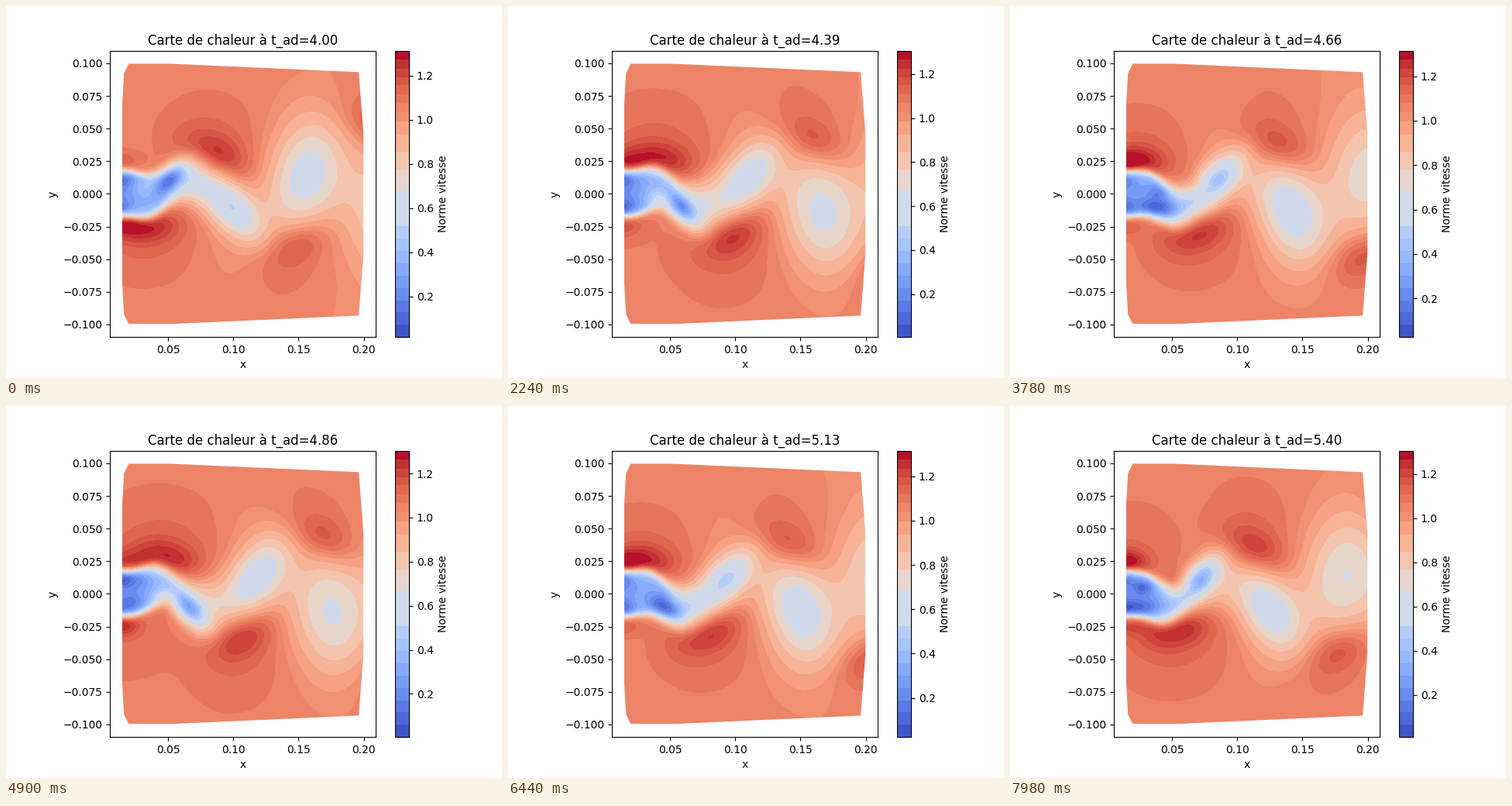
A matplotlib script for the animation above (8 s loop, 640 by 480 pixels).

```python
import numpy as np
import matplotlib.pyplot as plt
from matplotlib.animation import FuncAnimation
from matplotlib.colors import ListedColormap
from matplotlib.patches import Polygon

LOOP, TICK, HOLD = 8000, 40, 140      # ms
STEPS = 58
PERIOD = 6.18                         # steps per shedding cycle
X0, X1, Y1 = .0149, .1997, .0997      # extent of the data

plt.rcParams["font.family"] = "DejaVu Sans"
X, Y = np.meshgrid(np.linspace(X0, X1, 210), np.linspace(-Y1, Y1, 225))


def smooth(u):
    u = np.clip(u, 0, 1)
    return u * u * (3 - 2 * u)


def bell(t, mid, width):
    return np.exp(-((t - mid) / width) ** 2)


def bump(x, y, a, b, deg=0):
    """Tilted Gaussian with widths a and b."""
    c, s = np.cos(np.radians(deg)), np.sin(np.radians(deg))
    dx, dy = X - x, Y - y
    return np.exp(-.5 * (((dx * c + dy * s) / a) ** 2
                         + ((dy * c - dx * s) / b) ** 2))


def fast_x(t):
    """Fast core: rests at the body, then drifts at constant speed."""
    return .012 + .0205 * np.log1p(np.exp((t - .43) / .16))


def slow_x(t):
    """Slow core: gently accelerating."""
    return .008 + .08 * t + .012 * t * t


def slow_age(x):
    return (np.sqrt(.0064 + .048 * np.maximum(x - .008, 0)) - .08) / .024


def background():
    v = 1.055 - .03 * smooth((X - .12) / .08)
    v -= .06 * smooth((X - .09) / .06) * bell(Y, 0, .055)
    for s in (1, -1):
        v += .10 * bump(.014, s * .024, .009, .006)
        v -= .12 * bump(.0145, s * .011, .005, .004)
    return v


def ribbon(phase):
    """Meandering low-speed band behind the body."""
    amp = .88 / (1 + np.exp((X - .075) / .015))
    sway = .011 * smooth((X - .015) / .045)
    mid = -sway * np.cos(2 * np.pi * (slow_age(X - .012) - phase))
    half = .0175 - .0045 * bell(X, .058, .02)
    edge = .0017 + .008 * smooth((X - .02) / .1)
    return amp / (1 + np.exp((np.abs(Y - mid) - half) / edge))


def vortex(t, s):
    """Speed change from one vortex of age t on side s."""
    # fast side: core and halo
    x, y = fast_x(t), .022 + .007 * t * t
    tilt = -s * 28 * smooth((t - .4) / .7)
    v = .21 * smooth(t / .35) * np.exp(-.22 * t) * bump(
        x, s * y, .008 + .011 * smooth(t / .6), .0085 + .0025 * smooth(t),
        tilt)
    v += .07 * smooth(t / .4) * bump(x, s * (y + .010), .030, .025, tilt)

    # slow side: core and halo
    x, y = slow_x(t), -s * .011
    tilt = -s * (50 * smooth((t - .3) / .25) + 30 * smooth((t - .9) / .9))
    v -= .42 * smooth(t / .25) * bell(t, 1.12, .92) * bump(
        x, y, .010 + .020 * smooth((t - .3) / 1.3),
        .0045 + .017 * smooth((t - .4) / 1.5), tilt)
    v -= .055 * smooth((t - .4) / .8) * bump(x, -s * .042, .018, .026)

    # pale gap trailing the slow core, and a small dark eye near the body
    v += .30 * bell(t, .68, .24) * bump(x - .017, .4 * y, .009, .007)
    v -= .18 * bell(t, .27, .13) * bump(
        .009 + .08 * t, s * (.011 - .028 * t), .005, .004)
    return v


def speed(phase):
    v = BASE - ribbon(phase)
    for n in range(-2, 6):
        t = phase + n / 2
        if 0 <= t <= 2.4:
            v += vortex(t, (-1) ** n)
    return v


def limits(phase):
    """Colour range; it breathes twice per cycle."""
    return (.0145 + .0115 * np.cos(4 * np.pi * (phase - .38)),
            1.310 + .0065 * np.cos(4 * np.pi * (phase - .42)))


def banded_cmap():
    u = np.linspace(0, 1, 6)[:-1]
    edges = np.concatenate([np.linspace(0, .385, 10),
                            .515 + .27 * (1 - (1 - u) ** 1.35),
                            np.linspace(.785, 1, 8)])
    mids = (edges[1:] + edges[:-1]) / 2
    band = np.searchsorted(edges, (np.arange(256) + .5) / 256) - 1
    return ListedColormap(plt.get_cmap("coolwarm")(mids[band]))


BASE = background()
PHASES = [k / PERIOD % 1 for k in range(STEPS)]
FIELDS = [speed(p) for p in PHASES]

fig, ax = plt.subplots(figsize=(6.4, 4.8), dpi=100)
im = ax.imshow(FIELDS[0], origin="lower", extent=(X0, X1, -Y1, Y1),
               cmap=banded_cmap(), interpolation="bilinear")
im.set_clim(*limits(0))
pad = .05 * (X1 - X0)
ax.set_xlim(X0 - pad, X1 + pad)
ax.set_ylim(-1.1 * Y1, 1.1 * Y1)
ax.set_xlabel("x")
ax.set_ylabel("y")
title = ax.set_title("")
fig.colorbar(im, ax=ax, label="Norme vitesse")

upper = [(X0, .067), (.0163, .0922), (.0200, Y1), (.0508, Y1),
         (.1961, .0932), (X1, .046)]
outline = upper + [(x, -y) for x, y in reversed(upper)]
im.set_clip_path(Polygon(outline, transform=ax.transData))


def update(i):
    k = min(int((i + .5) * TICK // HOLD), STEPS - 1)
    label = f"Carte de chaleur à t_ad={4 + 1.4 * k / (STEPS - 1):.2f}"
    if title.get_text() != label:
        title.set_text(label)
        im.set_data(FIELDS[k])
        im.set_clim(*limits(PHASES[k]))
    return im, title


anim = FuncAnimation(fig, update, frames=LOOP // TICK, interval=TICK,
                     repeat=True, repeat_delay=0, blit=False)
plt.show()
```
